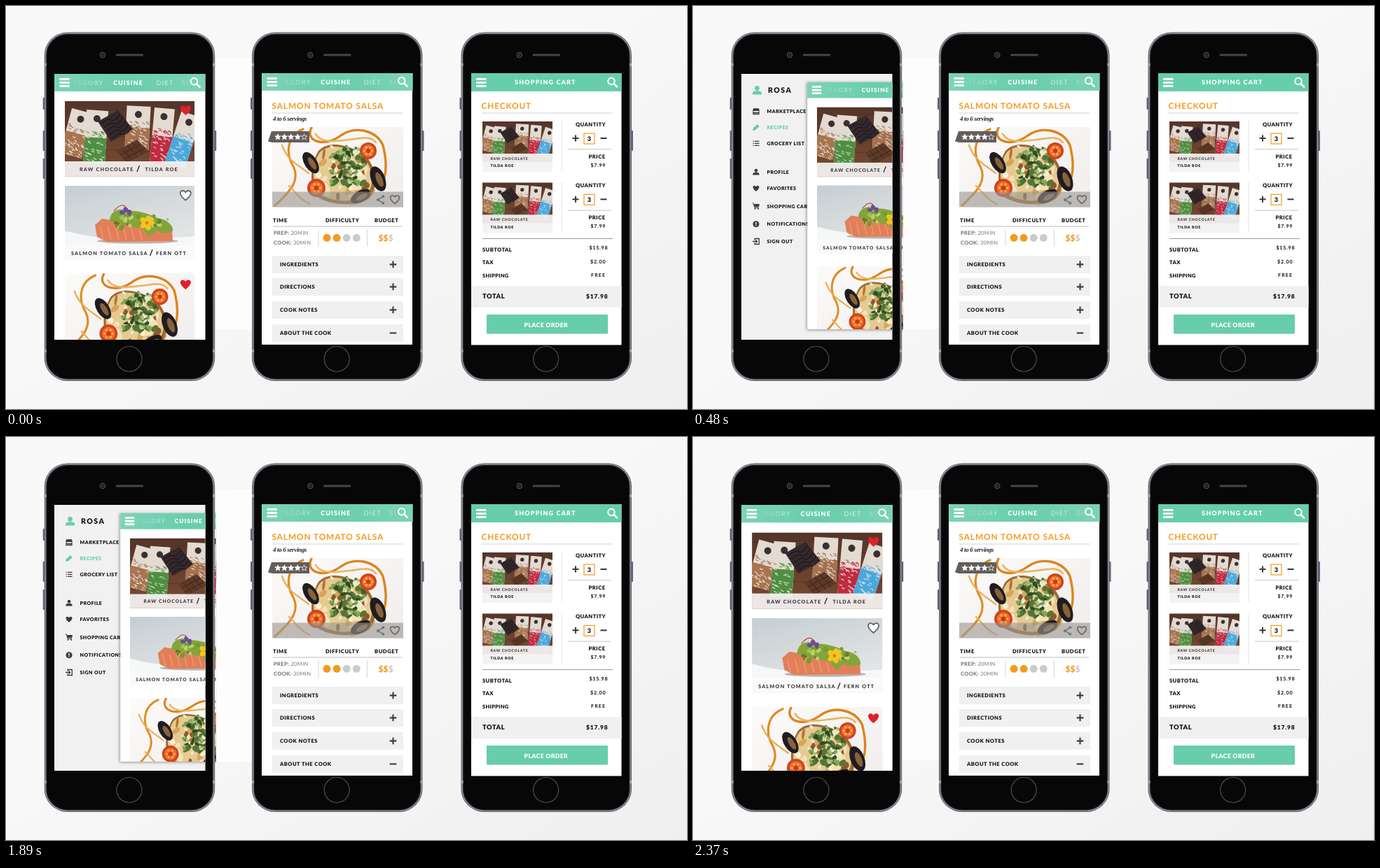
An HTML page that plays this animation: 972x576 px, repeating every 2640 ms.

```html
<!DOCTYPE html>
<html lang="en">
<head>
<meta charset="utf-8">
<title>Recipe app</title>
<style>
html, body { margin: 0; width: 100%; height: 100%; overflow: hidden; background: #f8f8f8; }
svg { display: block; width: 972px; height: 576px; }
text { font-family: Lato, sans-serif; text-rendering: geometricPrecision; white-space: pre; }
.script { font-family: "Liberation Serif", serif; font-style: italic; }
</style>
</head>
<body>
<svg id="stage" viewBox="0 0 972 576"></svg>
<script>
const TEAL = '#67cdab', ORANGE = '#f39a1f', INK = '#111', GREY = '#f0f0f0';
const MAKER = 'TILDA ROE', COOK = 'FERN OTT', USER = 'ROSA';

let seed = 7;
const rnd = (a, b) => {
  seed = (seed * 16807) % 2147483647;
  return +(a + (b - a) * seed / 2147483647).toFixed(1);
};
const times = (n, fn) => Array.from({ length: n }, (_, i) => fn(i)).join('');
const pick = list => list[Math.floor(rnd(0, list.length - .1))];

// Shape helpers
const rect = (x, y, w, h, fill, more = '') =>
  `<rect x="${x}" y="${y}" width="${w}" height="${h}" fill="${fill}" ${more}/>`;
const path = (d, fill, stroke = 'none', sw = 1, more = '') =>
  `<path d="${d}" fill="${fill}" stroke="${stroke}" stroke-width="${sw}" ${more}/>`;
const line = (d, color, sw = 1, more = '') => path(d, 'none', color, sw, more);
const dot = (x, y, r, fill, more = '') => `<circle cx="${x}" cy="${y}" r="${r}" fill="${fill}" ${more}/>`;
const oval = (x, y, rx, ry, turn, fill) =>
  `<ellipse rx="${rx}" ry="${ry}" transform="translate(${x} ${y}) rotate(${turn})" fill="${fill}"/>`;
const at = (x, y, inner, scale = 1) => `<g transform="translate(${x} ${y}) scale(${scale})">${inner}</g>`;
const text = (x, y, str, size, gap, fill = INK, weight = 900, more = '') =>
  `<text x="${x}" y="${y}" font-size="${size}" letter-spacing="${gap}" fill="${fill}" font-weight="${weight}" ${more}>${str}</text>`;
const use = (id, x, y, scale = 1) => `<use href="#${id}" transform="translate(${x} ${y}) scale(${scale})"/>`;
const clip = (id, w, h) => `<clipPath id="${id}">${rect(0, 0, w, h, '#000')}</clipPath>`;

// Icons
const HEART = 'M0 7C-10 -.5 -8.5 -6.5 -4 -6.5C-1.6 -6.5 0 -4.6 0 -3.4C0 -4.6 1.6 -6.5 4 -6.5C8.5 -6.5 10 -.5 0 7Z';
const heart = (x, y, fill, stroke = 'none', scale = 1) => at(x, y, path(HEART, fill, stroke, 1.8), scale);
const plus = (x, y, r = 4.8) => line(`M${x - r} ${y}h${2 * r}M${x} ${y - r}v${2 * r}`, '#3c3c3c', 2.1);
const minus = (x, y, r = 4.8) => line(`M${x - r} ${y}h${2 * r}`, '#3c3c3c', 2.1);
const burger = (x, y) => times(3, i => rect(x, y + i * 5, 14.5, 3, '#fff', 'rx="1"'));
const lens = (x, y) => dot(x, y, 4.7, 'none', 'stroke="#fff" stroke-width="2"') +
  line(`M${x + 3.6} ${y + 3.6}l4.4 4.4`, '#fff', 2.6, 'stroke-linecap="round"');
const star = (x, y, fill) => {
  const d = times(10, i => {
    const r = i % 2 ? 1.9 : 4.4, a = i * Math.PI / 5;
    return `${i ? 'L' : 'M'}${(x + r * Math.sin(a)).toFixed(2)} ${(y - r * Math.cos(a)).toFixed(2)}`;
  });
  return path(d + 'Z', fill, '#fff', .8);
};
const person = (x, y, s, fill) =>
  at(x, y, dot(0, -2.6, 3.3, fill) + path('M-6.5 6.5V4.5C-6.5 0 6.5 0 6.5 4.5V6.5Z', fill), s);

// Pictures, each drawn from its own top left corner
function wrapper(x, y, w, h, turn, color) {
  const marks = times(56, i => {
    const low = i % 2, px = rnd(-w / 2 + 1, w / 2 - 4), py = low ? rnd(0, h / 2 - 2) : rnd(-h / 7, h / 8);
    return line(`M${px} ${py}q${rnd(0, 4)} ${rnd(-4, 4)} 4 ${rnd(0, 3)}`, low ? '#efe8e2' : color, 1);
  });
  return `<g transform="translate(${x} ${y}) rotate(${turn})">` +
    rect(-w / 2, -h / 2, w, h, '#e3dad2') + rect(-w / 2, 0, w, h / 2, color) + marks +
    dot(0, -h / 2 + 12, 5, '#3a3030') + '</g>';
}

const chocolate = () => rect(0, 0, 185, 108, 'url(#wood)') +
  times(5, i => line(`M0 ${14 + i * 19}L185 ${8 + i * 20}`, '#3a2318', .8, 'opacity=".5"')) +
  wrapper(17, 46, 32, 66, 15, '#a9744f') + wrapper(44, 52, 31, 78, 4, '#4f8f42') +
  wrapper(104, 38, 34, 62, 3, '#a5714f') + wrapper(139, 50, 29, 80, 5, '#c02b40') +
  wrapper(169, 55, 30, 76, 18, '#4aa9dc') +
  path('M47 29L76 13L97 40L66 58Z', '#33282b') +
  times(5, i => line(`M${52 + i * 4} ${33 + i * 5}q8 -9 14 -6t13 -9`, '#1d1518', 1.2)) +
  path('M74 71L103 55L120 72L88 88Z', '#5d3a28') +
  line('M81 67L96 84M89 63L104 80M96 59L112 76M79 77L109 61M84 83L115 67', '#3c2318', 1);

const salmon = () => rect(0, 0, 185, 84, 'url(#haze)') +
  path('M0 64C40 76 90 79 185 72V84H0Z', '#f6f7f7') +
  oval(104, 79, 58, 3.5, 0, '#b9b4b0') +
  path('M43 56L53 47L120 58L153 64L154 79L60 80L46 73Z', '#e27f58') +
  times(6, i => line(`M${50 + i * 11} 57l5 20`, '#ef9f7d', 1.2)) +
  path('M64 50C64 36 78 30 90 36C104 35 120 40 132 46C146 48 155 56 154 65L140 68L130 64L120 74L112 62Z', '#83a53a') +
  times(34, () => dot(rnd(70, 148), rnd(40, 63), rnd(1.5, 3.6), pick(['#5c7f28', '#a3c24c', '#bdd06a', '#759b30']))) +
  times(3, i => oval(82 + i * 5, 38 - i % 2 * 4, 4, 3, i * 50, '#6d4a9c')) +
  times(5, i => oval(117 + 6 * Math.cos(i * 1.26), 53 + 6 * Math.sin(i * 1.26), 5, 4, i * 72, '#f3c41e')) +
  dot(117, 53, 2.4, '#d98413') +
  line('M70 36q12 -14 18 -4', '#b5473c', 1.2);

const tomato = (x, y, r) => dot(x, y, r, '#d2421c') + dot(x, y, r * .72, '#ee7030') +
  times(6, i => dot(x + r * .45 * Math.cos(i * 1.05), y + r * .45 * Math.sin(i * 1.05), 1.7, '#f6b04d')) +
  dot(x, y, r * .25, '#c93a19');
const mussel = (x, y, turn, s = 1) => oval(x, y, 9 * s, 17 * s, turn, '#1f1c22') + oval(x + 2, y + 1, 4 * s, 10 * s, turn, '#8a6238');

const ROUND = 'stroke-linecap="round"';
const dish = () => rect(0, 0, 187, 115, 'url(#plate)') +
  line('M44 3C22 12 18 36 30 56C40 76 26 92 4 112', '#e08c26', 3.2, ROUND) +
  line('M14 26C22 48 34 52 52 66M24 84C34 94 40 104 54 110', '#ecae58', 2.4, ROUND) +
  line('M56 1C46 20 74 30 98 12C118 -2 148 4 158 26C162 42 164 58 160 72', '#dd8420', 3.4, ROUND) +
  line('M62 10C70 24 92 20 110 18S140 12 148 22M146 90C140 104 128 108 112 111', '#eab463', 2.6, ROUND) +
  path('M66 34C82 18 108 26 130 38C148 54 154 84 138 102C112 116 80 110 64 100C52 82 54 54 66 34Z', '#9c6a32') +
  path('M68 36C82 22 106 28 126 40C144 54 148 82 134 98C112 110 84 106 68 96C56 80 56 54 68 36Z', '#e6ca92') +
  times(38, () => oval(rnd(66, 136), rnd(36, 102), rnd(3, 9), rnd(2, 5), rnd(0, 180),
    pick(['#f8efd4', '#d9a658', '#b8752f', '#f3e2b8', '#8a5a2c']))) +
  mussel(55, 51, -32) + mussel(151, 74, -22, 1.1) + mussel(126, 99, 62, .9) +
  times(26, () => oval(rnd(84, 130), rnd(30, 84), rnd(4, 8), rnd(2, 4), rnd(0, 180), pick(['#2f4a24', '#52763a']))) +
  times(64, () => oval(rnd(82, 132), rnd(27, 86), rnd(2, 5), rnd(1.4, 3), rnd(0, 180),
    pick(['#4f7a35', '#7fa650', '#a9c27a', '#e6ebc8', '#3d6130']))) +
  tomato(137, 34, 12) + tomato(63, 87, 13);

const stop = (o, c, a = 1) => `<stop offset="${o}" stop-color="${c}" stop-opacity="${a}"/>`;
const blend = (id, dir, stops) => `<linearGradient id="${id}" ${dir}>${stops}</linearGradient>`;
const defs = () => '<defs>' +
  blend('back', 'x1="0" y1="0" x2="1" y2="1"', stop(0, '#f9f9f9') + stop(.45, '#f8f8f8') + stop(1, '#efeff0')) +
  blend('wood', 'x1="0" y1="0" x2="0" y2="1"', stop(0, '#553529') + stop(1, '#7a4c33')) +
  blend('haze', 'x1="0" y1="0" x2=".6" y2="1"', stop(0, '#c6ced2') + stop(1, '#e2e4e5')) +
  blend('plate', 'x1="0" y1="0" x2="1" y2="1"', stop(0, '#fcfbfa') + stop(1, '#f0edeb')) +
  blend('bar', '', stop(0, '#7cd3b8') + stop(.5, '#69cdac') + stop(1, '#7cd3b8')) +
  blend('fadeIn', '', stop(.1, '#fff', 0) + stop(1, '#fff', .65)) +
  blend('fadeOut', '', stop(0, '#fff', .4) + stop(1, '#fff', .05)) +
  '<filter id="soft" x="-10%" y="-10%" width="120%" height="120%"><feGaussianBlur stdDeviation="2.5"/></filter>' +
  clip('chocBox', 185, 108) + clip('salmonBox', 185, 84) + clip('dishBox', 187, 115) +
  `<clipPath id="screen">${rect(69, 97, 215.5, 380, '#000')}${rect(298, 97, 1.5, 380, '#000')}</clipPath>` +
  `<clipPath id="sheet">${rect(69, 97, 215.5, 383, '#000')}</clipPath>` +
  `<g id="choc" clip-path="url(#chocBox)">${chocolate()}</g>` +
  `<g id="salmon" clip-path="url(#salmonBox)">${salmon()}</g>` +
  `<g id="dish" clip-path="url(#dishBox)">${dish()}</g></defs>`;

// Phone body; x is the left edge
const key = (x, y, h) => rect(x, y, 3, h, '#64636f', 'rx="1"');
const phone = x => key(x - 2, 131, 17) + key(x - 2, 178, 29) + key(x - 2, 218, 29) + key(x + 242.5, 178, 29) +
  rect(x, 37.5, 243.5, 498.5, '#5d5c68', 'rx="33"') +
  rect(x + 1.7, 39.2, 240.1, 495.1, '#1b1a1f', 'rx="31.3" stroke="#8b8a96" stroke-width="1.8"') +
  rect(x + 4, 41.5, 235.5, 490.5, '#070707', 'rx="29"') +
  [82, 491].map(y => rect(x, y, 3, 4, '#a4a3ab') + rect(x + 240.5, y, 3, 4, '#a4a3ab')).join('') +
  dot(x + 83.3, 70, 3.6, '#17171a', 'stroke="#4d4d52" stroke-width="1.3"') + dot(x + 83.3, 70, 1.3, '#3c3c52') +
  rect(x + 102, 68.5, 39.5, 3, '#454548', 'rx="1.5"') +
  dot(x + 121.2, 504.5, 18, 'none', 'stroke="#4c4c4f" stroke-width="1.2"');

const tabs = rect(69, 97, 215.5, 25, 'url(#bar)') +
  text(82, 112.5, 'CATEGORY', 9, 1.35, 'url(#fadeIn)', 400) + text(153, 112.5, 'CUISINE', 9, 1.1, '#fff') +
  text(214.5, 112.5, 'DIET', 9, 1.3, '#fff', 400, 'opacity=".65"') + text(251, 112.5, 'SE', 9, 1.3, 'url(#fadeOut)', 400) +
  burger(76.3, 103) + lens(268.5, 107.8);

const caption = (y, x1, name, x2, x3, who) => text(x1, y, name, 7.2, 1.2, '#333', 800) +
  line(`M${x2} ${y + 1}l3.5 -9`, '#222', 1.3) + text(x3, y, who, 7.2, 1.2, '#333', 800);

const feed = () => rect(69, 97, 215.5, 383, '#fff') + tabs +
  use('choc', 84, 136) + rect(84, 222, 185.5, 22, '#f6f3f2', 'opacity=".93"') + rect(84, 243.3, 185.5, .8, '#d5d0cd') +
  caption(236, 105, 'RAW CHOCOLATE', 187, 198.5, MAKER) + heart(256.5, 149, '#e01f2d') +
  use('salmon', 84, 257) + rect(84, 341, 185.5, 22, '#fafafa') +
  caption(356, 93, 'SALMON TOMATO SALSA', 205.5, 214, COOK) + heart(256.3, 270.5, '#fff', '#666') +
  use('dish', 84, 382, .99) + heart(256.3, 398, '#e01f2d');

function menu() {
  const rows = [['MARKETPLACE', 150.5], ['RECIPES', 173.5], ['GROCERY LIST', 196.3], ['PROFILE', 237],
    ['FAVORITES', 260.3], ['SHOPPING CART', 286], ['NOTIFICATIONS', 311.7], ['SIGN OUT', 336.5]];
  const ink = '#3a3a3a';
  const icons = [
    path('M-3.8 -4.2H3.8L5 -.5H-5Z', ink) + line('M-4 0V4H4V0M-4 2H4', ink, 1.3),
    path('M-5 4.5L-4 .8L2 -4.5L4.8 -1.5L-1 4Z', TEAL),
    line('M-2 -3H4.5M-2 0H4.5M-2 3H4.5M-4.5 -3h1.3M-4.5 0h1.3M-4.5 3h1.3', ink, 1.3),
    person(0, 0, .7, ink),
    heart(0, .4, ink, 'none', .6),
    path('M-3.2 -3H5L4 1.2H-2.4Z', ink) + line('M-5.2 -4.2H-3.6L-2 2.4H4', ink, 1) + dot(-1.5, 4, 1, ink) + dot(3.2, 4, 1, ink),
    dot(0, 0, 4.5, ink) + line('M0 -2.8V.7M0 1.6V2.9', '#fff', 1.4),
    line('M-2 -2V-4H4.3V4H-2V2M-5 0H1.5M-.5 -2L1.6 0L-.5 2', ink, 1.3)
  ];
  return rect(69, 97, 215.5, 380, '#f1f1f1') + person(91.5, 120, 1, TEAL) + text(107, 123.8, USER, 10.5, 1.5) +
    rows.map(([name, y], i) =>
      at(90, y, icons[i]) + text(105.5, y + 2.6, name, 7, .48, i === 1 ? TEAL : INK)).join('');
}

function recipe() {
  const fold = [['INGREDIENTS', 357], ['DIRECTIONS', 389], ['COOK NOTES', 422], ['ABOUT THE COOK', 455]];
  return rect(365, 96, 215, 388, '#fff') + at(296.2, -1, tabs) +
    text(379.5, 146.5, 'SALMON TOMATO SALSA', 11.8, .93, ORANGE, 700) + line('M380 153H567', '#bbb', 1, 'stroke-dasharray="1.5 .7"') +
    text(381, 164, '4 to 6 servings', 9, -.35, '#222', 700, 'class="script"') +
    use('dish', 380, 173) + rect(380, 265.5, 187, 22, '#9a9692', 'opacity=".6"') +
    path('M379 179H433V195H380L374 193.5Z', '#625e5b') + times(5, i => star(388 + i * 9.4, 187.3, i < 4 ? '#fff' : 'none')) +
    line('M538 272.5L531 277L538 281.5', '#777', 1.5) +
    [[538.3, 272.3], [530.8, 277], [538.3, 281.7]].map(([x, y]) => dot(x, y, 2, '#777')).join('') +
    heart(555, 276.5, 'none', '#666', .85) +
    text(381, 309.3, 'TIME', 7.5, .6) + text(456, 309.3, 'DIFFICULTY', 7.6, .55) + text(526, 309.3, 'BUDGET', 7.6, .55) +
    line('M381 315H565', '#bbb') +
    line('M446 320V344M515.5 320V344', '#aaa', 1, 'stroke-dasharray="1 1"') +
    text(382, 327.3, 'PREP: <tspan font-weight="400">20MIN</tspan>', 7.6, .3, '#777', 800) +
    text(382, 340.5, 'COOK: <tspan font-weight="400">30MIN</tspan>', 7.6, .3, '#777', 800) +
    times(4, i => dot(458 + i * 14.1, 331.3, 5.5, i < 2 ? ORANGE : '#cbcbcb')) +
    text(531.5, 335.7, '$$<tspan fill="#c4c4c4" font-weight="700">$</tspan>', 12, .1, ORANGE, 800) +
    fold.map(([name, y], i) => rect(380, y, 187, 25, GREY) + text(391, y + 15.3, name, 7.5, .5) +
      (i < 3 ? plus : minus)(552.5, y + 12.4)).join('');
}

const item = rect(680, 165, 100, 72, '#f3f3f3') + use('choc', 680, 165, .5405) +
  rect(680, 211, 100, 26, '#f5f4f4', 'opacity=".93"') +
  text(691.5, 219.5, 'RAW CHOCOLATE', 5.2, .7, '#333', 800) + text(691.5, 230.3, MAKER, 5.3, .7) +
  line('M793 165V237', '#cfc8bb', 1, 'stroke-dasharray="1 1"') +
  text(813, 172, 'QUANTITY', 7.6, .4) + plus(813, 189, 4.5) + minus(853, 189, 4.5) +
  rect(825, 182, 15, 15, '#fff', `stroke="${ORANGE}" stroke-width="1.2"`) + text(829.7, 192.5, '3', 9, 0) +
  line('M802 204.8H864', '#c4c4c4') + text(831.5, 217.5, 'PRICE', 7.6, .5) + text(834.5, 229.5, '$7.99', 7, .7, INK, 700);

const cart = () => rect(664, 96, 214.5, 388.5, '#fff') + rect(664, 96, 214.5, 26, TEAL) +
  burger(671, 103) + text(726, 112.3, 'SHOPPING CART', 9, 1.15, '#fff') + lens(864, 107.5) +
  text(678.5, 147, 'CHECKOUT', 11.8, .9, ORANGE, 700) + line('M679 153H865', '#bbb', 1, 'stroke-dasharray="1.5 .7"') +
  item + at(0, 87.3, item) + line('M680 332.5H866', '#999') +
  text(680, 350.5, 'SUBTOTAL', 7.6, .4) + text(832.5, 348.3, '$15.98', 7.2, .7, INK, 700) +
  text(680, 369, 'TAX', 7.6, .4) + text(834, 368, '$2.00', 7.2, .8, INK, 700) +
  text(680, 387.5, 'SHIPPING', 7.4, .35) + text(835, 387.3, 'FREE', 7, 1.2, INK, 700) +
  rect(664, 400, 214.5, 31, GREY) + text(680, 418, 'TOTAL', 9.4, .5) + text(828, 418, '$17.98', 8.5, .8) +
  rect(686, 441, 173, 27.5, TEAL, 'rx="1"') + text(739.5, 458.8, 'PLACE ORDER', 8.7, .35, '#fff');

const stage = document.getElementById('stage');
stage.innerHTML = defs() + rect(0, 0, 972, 576, 'url(#back)') + rect(299, 75, 55, 387, '#fff', 'opacity=".75"') +
  '<rect id="spill" x="299" y="462" fill="#fff"/>' +
  phone(54.7) + phone(351) + phone(649.5) + menu() +
  '<g clip-path="url(#screen)"><g id="panel">' +
  rect(68, 98, 216, 383, '#000', 'opacity=".4" filter="url(#soft)"') +
  `<g clip-path="url(#sheet)">${feed()}</g></g></g>` + recipe() + cart();

const panel = document.getElementById('panel'), spill = document.getElementById('spill');
const LOOP = 2640, STEP = 30, MOVES = 25, CLOSE = 1620, SMALL = .88;
const mix = (a, b, p) => a + (b - a) * p;

function draw(t) {
  const closing = t >= CLOSE + STEP;
  const moved = Math.min(MOVES, Math.floor((closing ? t - CLOSE : t) / STEP)) / MOVES;
  const p = closing ? 1 - moved : moved;
  // The panel comes back slightly larger than it left
  const sx = mix(closing ? 1.007 : 1, SMALL, p), sy = mix(closing ? 1.013 : 1, SMALL, p);
  const x = mix(69, 216, p), y = mix(97, 115, p);
  panel.setAttribute('transform', `translate(${x} ${y}) scale(${sx} ${sy}) translate(-69 -97)`);
  spill.setAttribute('width', Math.max(0, Math.min(354, x + 215.5 * sx) - 299));
  spill.setAttribute('height', Math.max(0, Math.min(477, y + 383 * sy) - 462));
}

const start = performance.now();
function tick() {
  draw((performance.now() - start) % LOOP);
  requestAnimationFrame(tick);
}
tick();
</script>
</body>
</html>
```
